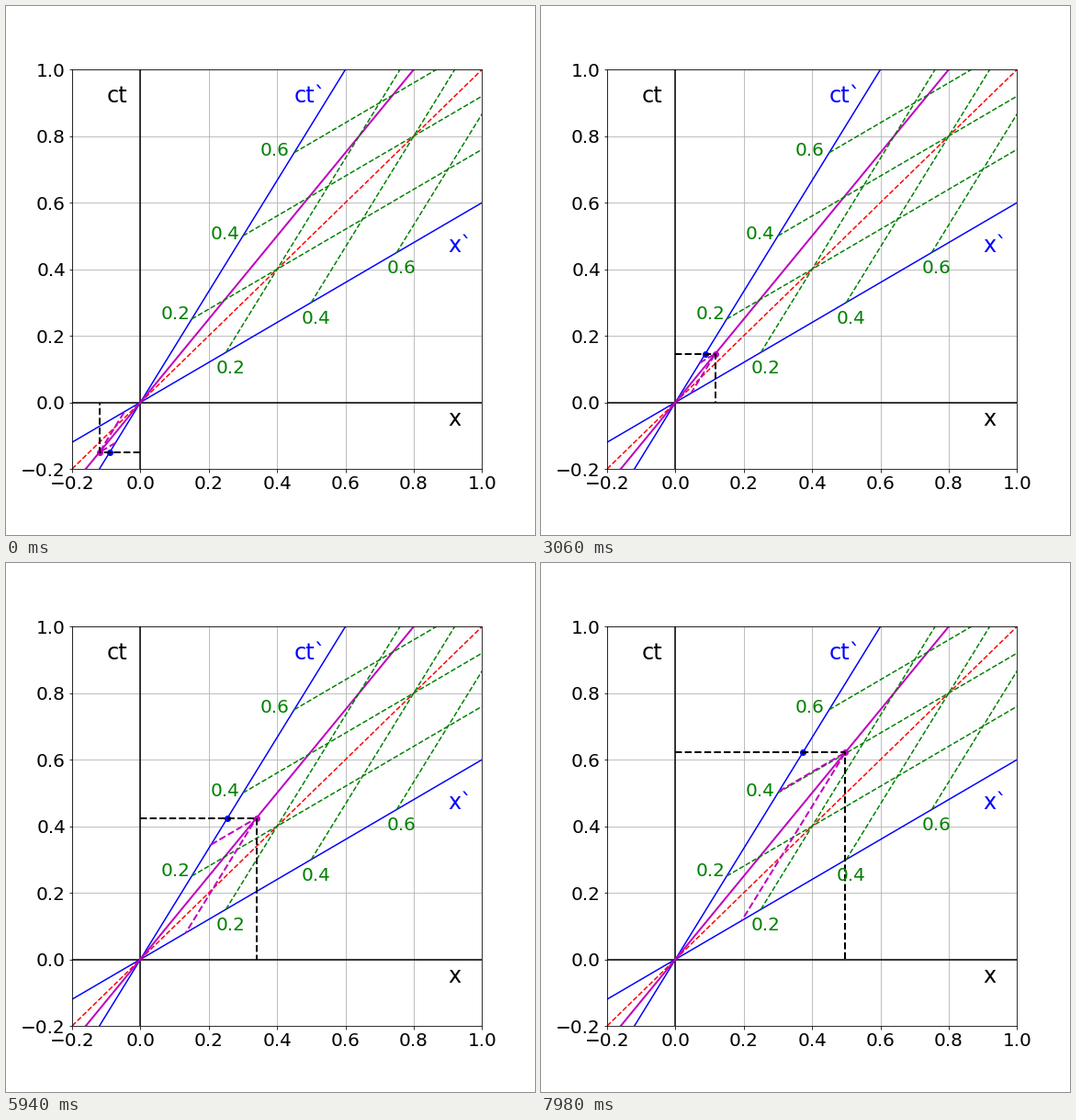
Animation of 576 by 576 pixels, one loop 8000 ms. Source, as a matplotlib script:

```python
import matplotlib.pyplot as plt
from matplotlib.animation import FuncAnimation

BETA = 0.6                        # speed of the moving frame
GAMMA = 1 / (1 - BETA ** 2) ** 0.5
SPEED = 0.8                       # slope dx/dt of the tracked worldline
LO, HI = -0.2, 1.0
T_START, T_STEP = -0.15, 0.0058
TICK_MS, HOLD, LOOP_MS = 20, 3, 8000   # the point moves every HOLD ticks

plt.rcParams["font.family"] = "DejaVu Sans"
fig = plt.figure(figsize=(8, 8), dpi=72, facecolor="white")
fig.subplots_adjust(left=0.125, right=0.9, bottom=0.125, top=0.88)
ax = fig.add_subplot()
ax.set(xlim=(LO, HI), ylim=(LO, HI))
ax.tick_params(labelsize=20)
ax.grid(True)


def to_rest(x, t):
    """Moving-frame coordinates to rest-frame coordinates."""
    return GAMMA * (x + BETA * t), GAMMA * (t + BETA * x)


def to_moving(x, t):
    return GAMMA * (x - BETA * t), GAMMA * (t - BETA * x)


def segment(p, q, color, style="-", width=1.5):
    ax.plot([p[0], q[0]], [p[1], q[1]], color=color, ls=style, lw=width)


# Axes of both frames, the light ray and the worldline
ax.axhline(0, color="k", lw=1.5)
ax.axvline(0, color="k", lw=1.5)
segment((LO, BETA * LO), (HI, BETA * HI), "b")
segment((BETA * LO, LO), (BETA * HI, HI), "b")
segment((LO, LO), (HI, HI), "r", "--")
segment((SPEED * LO, LO), (SPEED * HI, HI), "m", width=2)

# Oblique coordinate grid
for k in (0.2, 0.4, 0.6):
    x0, t0 = to_rest(0, k)
    x_end = min(HI, x0 + (HI - t0) / BETA)
    segment((x0, t0), (x_end, t0 + BETA * (x_end - x0)), "g", "--")
    x0, t0 = to_rest(k, 0)
    t_end = min(HI, t0 + (HI - x0) / BETA)
    segment((x0, t0), (x0 + BETA * (t_end - t0), t_end), "g", "--")
    ax.text(1.25 * k - 0.03, 0.75 * k - 0.063, f"{k}", color="g", size=20)

for x, t, label in ((0.06, 0.249, "0.2"), (0.205, 0.49, "0.4"),
                    (0.35, 0.74, "0.6")):
    ax.text(x, t, label, color="g", size=20)

for x, t, label, color in ((-0.1, 0.9, "ct", "k"), (0.9, -0.07, "x", "k"),
                           (0.45, 0.9, "ct`", "b"), (0.9, 0.45, "x`", "b")):
    ax.text(x, t, label, color=color, size=24)

# Moving parts
event, = ax.plot([], [], "mo", ms=6)
clock, = ax.plot([], [], "bo", ms=6)
oblique, = ax.plot([], [], "m--", lw=2)
upright, = ax.plot([], [], "k--", lw=2)


def update(i):
    t = T_START + T_STEP * (i // HOLD)
    x = SPEED * t
    xm, tm = to_moving(x, t)
    a, b = to_rest(0, tm), to_rest(xm, 0)
    event.set_data([x], [t])
    clock.set_data([BETA * t], [t])
    oblique.set_data([a[0], x, b[0]], [a[1], t, b[1]])
    upright.set_data([0, x, x], [t, t, 0])
    return event, clock, oblique, upright


anim = FuncAnimation(fig, update, frames=LOOP_MS // TICK_MS,
                     init_func=lambda: update(0), interval=TICK_MS,
                     repeat=True, repeat_delay=0, blit=True)
plt.show()
```
